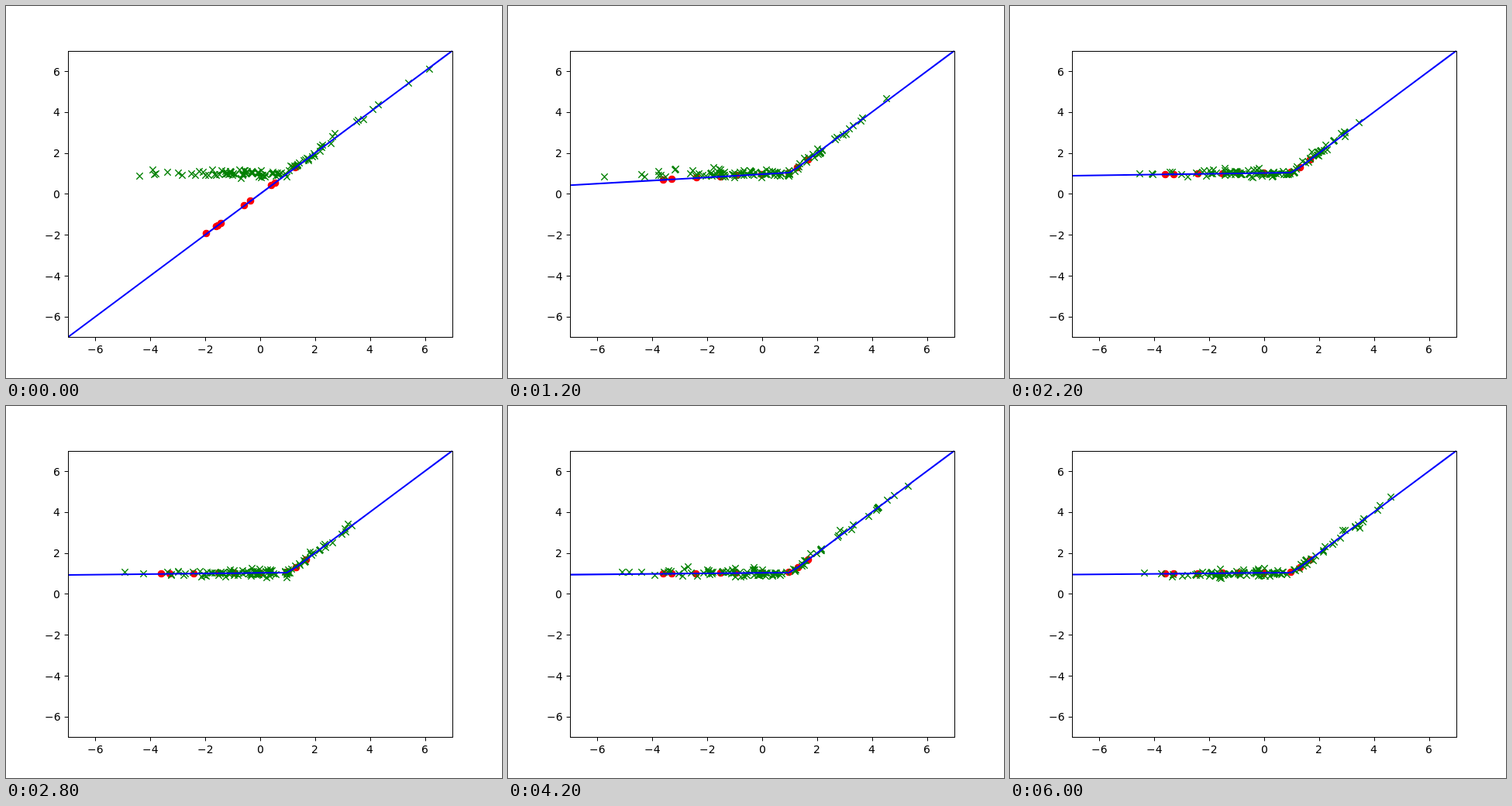
These frames come from a looping animation (640 px wide and 480 px high, 6200 ms). An HTML page:

```html
<!DOCTYPE html>
<html lang="en">
<head>
<meta charset="utf-8">
<title>Piecewise linear fit</title>
<style>
  html, body { margin: 0; width: 100%; height: 100%; overflow: hidden; background: #fff; }
  svg { display: block; }
  text { font: 13.89px "DejaVu Sans", sans-serif; fill: #000; }
  .axis { fill: none; stroke: #000; stroke-width: 1; }
  #dots { fill: #f00; }
  #crosses { fill: none; stroke: #008000; stroke-width: 1.39; }
  #line { fill: none; stroke: #00f; stroke-width: 2.08; stroke-linejoin: round; }
</style>
</head>
<body>
<svg width="640" height="480" viewBox="0 0 640 480">
  <clipPath id="plot"><rect x="80" y="57.6" width="496" height="369.6"/></clipPath>
  <g clip-path="url(#plot)">
    <path id="dots"/>
    <path id="crosses"/>
    <path id="line"/>
  </g>
  <path id="ticks" class="axis"/>
  <rect class="axis" x="80.5" y="58.5" width="496" height="369"/>
  <g id="labels"></g>
</svg>
<script>
const STEP = 200, STEPS = 31, SAMPLES = 100, LIMIT = 7;
const DIGIT = 8.84, MINUS = 11.64; // glyph advances, used to align labels
const $ = id => document.getElementById(id);
const px = x => 328 + x * 496 / 14;
const py = y => 242.4 - y * 26.4;
const mix = (a, b, p) => a + (b - a) * p;

// Knot positions before and after training.
const firstX = [-1.95, -1.6, -1.55, -1.43, -0.58, -0.36, 0.4, 0.54, 1.28];
const finalX = [-3.61, -3.3, -2.4, -1.5, -0.94, 0, 0.98, 1.3, 1.67];

function random(seed) {
  return () => {
    seed = (seed + 0x6D2B79F5) | 0;
    let t = Math.imul(seed ^ (seed >>> 15), 1 | seed);
    t = (t + Math.imul(t ^ (t >>> 7), 61 | t)) ^ t;
    return ((t ^ (t >>> 14)) >>> 0) / 4294967296;
  };
}

// Each step draws a fresh noisy batch of max(1, x), with x normally distributed.
function samples(step) {
  const rnd = random(step * 7919 + 17);
  const normal = () =>
    Math.sqrt(-2 * Math.log(1 - rnd())) * Math.cos(2 * Math.PI * rnd());
  return Array.from({ length: SAMPLES }, () => {
    const x = 2 * normal();
    return [px(x), py(Math.max(1, x) + 0.1 * normal())];
  });
}

// The left arm starts on y = x and decays to a nearly flat line.
function fit(step) {
  const error = Math.exp(-step / 2.2);
  const level = mix(1.04, 1, error), tilt = mix(0.1, 8, error) / 8;
  const y = x => Math.max(level - tilt * (1 - x), x);
  const knots = finalX.map((x, i) => mix(x, firstX[i], error ** 2));
  return [-LIMIT, ...knots, LIMIT].map(x => [px(x), py(y(x))]);
}

// Markers sit on pixel centres.
const cross = ([x, y]) =>
  `M${Math.floor(x) - 3.67} ${Math.floor(y) - 3.67}l8.34 8.34m0-8.34l-8.34 8.34`;
const dot = ([x, y]) =>
  `M${Math.floor(x) - 4.36} ${Math.floor(y) + 0.5}a4.86 4.86 0 1 0 9.72 0a4.86 4.86 0 1 0-9.72 0`;

const scenes = Array.from({ length: STEPS }, (_, step) => {
  const points = fit(step);
  return {
    dots: points.slice(1, -1).map(dot).join(""),
    crosses: samples(step).map(cross).join(""),
    line: "M" + points.map(p => p.join(" ")).join("L")
  };
});

function label(text, x, y) {
  const el = document.createElementNS("http://www.w3.org/2000/svg", "text");
  el.setAttribute("x", Math.round(x));
  el.setAttribute("y", Math.round(y));
  el.textContent = text;
  $("labels").append(el);
}

let ticks = "";
for (let v = -6; v <= 6; v += 2) {
  const text = String(v).replace("-", "\u2212");
  const width = DIGIT + (v < 0 ? MINUS : 0);
  const x = Math.round(px(v)) + 0.5, y = Math.round(py(v)) + 0.5;
  ticks += `M${x} 427.5v4.86M80.5 ${y}h-4.86`;
  label(text, px(v) - width / 2, 448);
  label(text, 70.28 - width, py(v) + 5.5);
}
$("ticks").setAttribute("d", ticks);

let shown = -1;
function draw(now) {
  const step = Math.floor(now / STEP) % STEPS;
  if (step !== shown) {
    shown = step;
    for (const [id, d] of Object.entries(scenes[step])) $(id).setAttribute("d", d);
  }
}

const start = performance.now();
function tick() {
  draw(performance.now() - start);
  requestAnimationFrame(tick);
}
tick();
</script>
</body>
</html>
```
